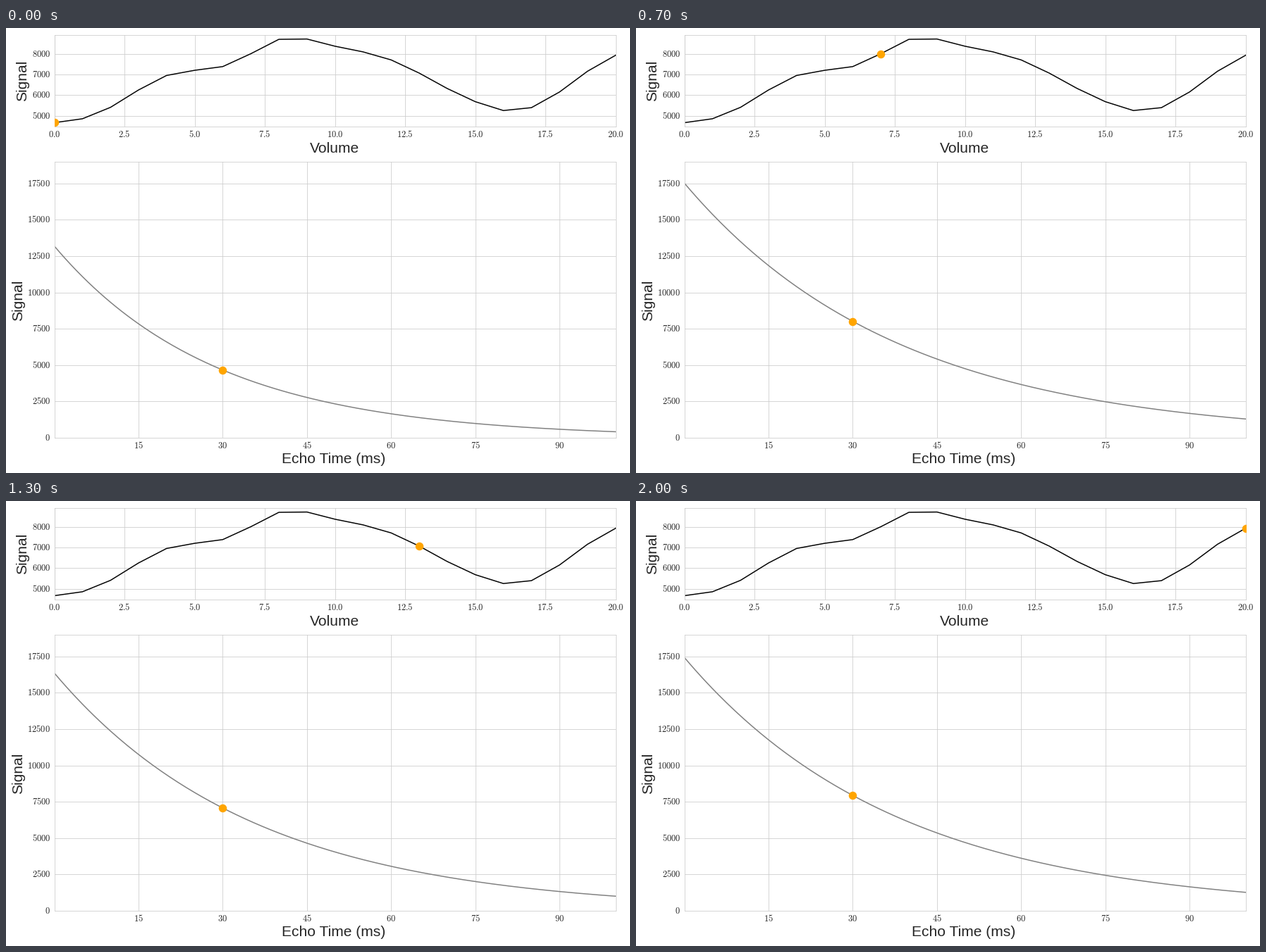
Write a matplotlib script that moves like this. It is 885 px wide and 632 px high and loops after 2.1 s.

```python
import numpy as np
import matplotlib.pyplot as plt
from matplotlib.animation import FuncAnimation

W, H, DPI = 885, 632, 100
PX = 72 / DPI  # points per pixel
LEFT, RIGHT = 68.6, 864.6
INK, GRID = "0.15", "0.8"
S0, T2, ECHO = 16000, 35, 30

plt.rcParams.update({"mathtext.fontset": "cm", "text.color": INK})

signal = np.array([4660, 4850, 5405, 6250, 6955, 7205, 7385, 8010, 8710, 8725,
                   8375, 8100, 7710, 7070, 6320, 5680, 5250, 5390, 6150, 7160,
                   7935])
volumes = np.arange(len(signal))
times = np.linspace(0, 100, 201)


def decay(t, k):
    """Signal decay when both S0 and T2* are scaled by k."""
    return S0 * k * np.exp(-t / (T2 * k))


# Invert the decay at the echo time to get the scale of each volume.
k_grid = np.linspace(0.7, 1.3, 2000)
scales = np.interp(signal, decay(ECHO, k_grid), k_grid)

fig = plt.figure(figsize=(W / DPI, H / DPI), dpi=DPI, facecolor="white")


def make_axes(top, bottom, xlim, ylim, xticks, yticks, xfmt):
    ax = fig.add_axes([LEFT / W, 1 - bottom / H,
                       (RIGHT - LEFT) / W, (bottom - top) / H])
    ax.set(xlim=xlim, ylim=ylim, xticks=xticks, yticks=yticks)
    ax.set_axisbelow(True)
    ax.grid(color=GRID, lw=0.8 * PX)
    ax.tick_params(length=0, labelbottom=False, labelleft=False)
    for spine in ax.spines.values():
        spine.set(color=GRID, linewidth=0.8 * PX)

    def tick(text, xy, coords, offset, ha):
        ax.annotate(rf"$\mathrm{{{text}}}$", xy, offset, xycoords=coords,
                    textcoords="offset pixels", ha=ha, va="baseline",
                    fontsize=12.5 * PX)

    for x in xticks:
        tick(f"{x:{xfmt}}", (x, 0), ax.get_xaxis_transform(),
             (0, -15), "center")
    for y in yticks:
        tick(f"{y:d}", (0, y), ax.get_yaxis_transform(), (-5.5, -4), "right")
    return ax


def label(text, x, y, rotation=0):
    fig.text(x / W, 1 - y / H, text, rotation=rotation, ha="center",
             va="baseline", rotation_mode="anchor", fontsize=21 * PX,
             family="Liberation Sans")


def dot(ax, x, y):
    return ax.scatter([x], [y], s=(10 * PX) ** 2, lw=1.5 * PX,
                      color="orange", zorder=100)


margin = 0.05 * np.ptp(signal)
series_ax = make_axes(9.7, 140.4, (0, 20),
                      (signal.min() - margin, signal.max() + margin),
                      np.arange(0, 20.1, 2.5), range(5000, 8001, 1000), ".1f")
decay_ax = make_axes(189.8, 581.9, (0, 100), (0, 19000),
                     range(15, 91, 15), range(0, 17501, 2500), "d")

label("Volume", 466, 177)
label("Echo Time (ms)", 465, 618)
label("Signal", 29.5, 75.2, 90)
label("Signal", 22.8, 386.7, 90)

series_ax.plot(volumes, signal, color="black", lw=1.5 * PX)
curve, = decay_ax.plot(times, decay(times, scales[0]), color="gray",
                       lw=1.5 * PX)
series_dot = dot(series_ax, 0, signal[0])
decay_dot = dot(decay_ax, ECHO, signal[0])


def update(i):
    curve.set_ydata(decay(times, scales[i]))
    series_dot.set_offsets([(volumes[i], signal[i])])
    decay_dot.set_offsets([(ECHO, signal[i])])
    return curve, series_dot, decay_dot


anim = FuncAnimation(fig, update, frames=len(signal), interval=100,
                     repeat=True, repeat_delay=0, blit=False)
plt.show()
```
